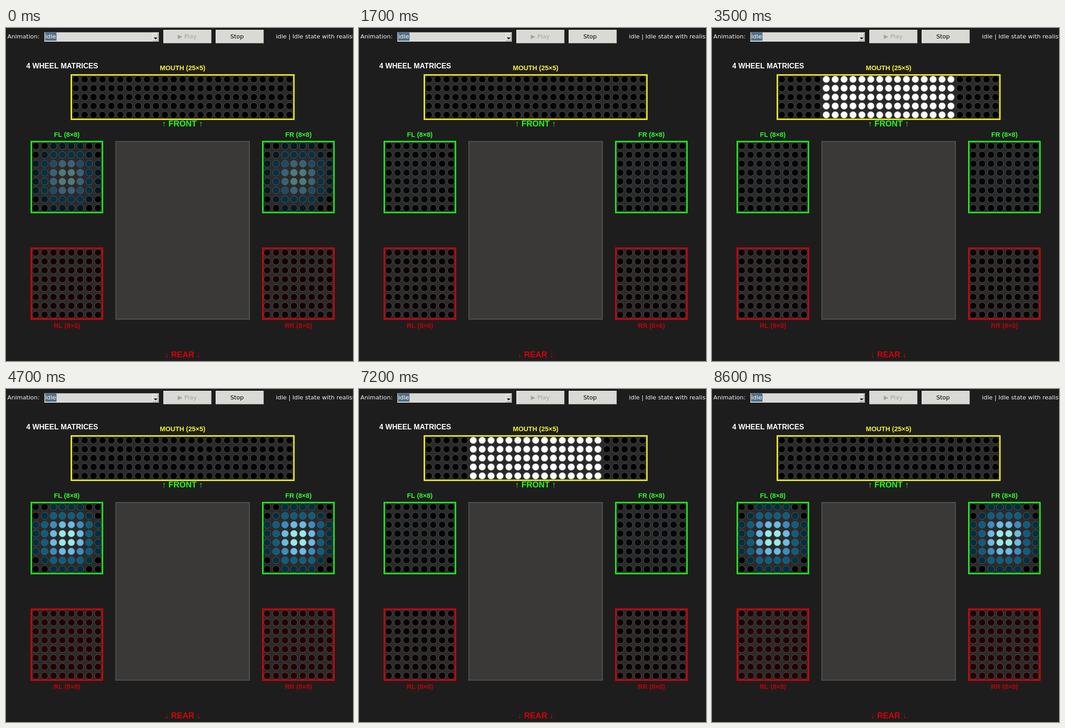
Animation of 763x734 px, one loop 8900 ms. Source, as an HTML page with a canvas:

```html
<!DOCTYPE html>
<html lang="en">
<head>
<meta charset="utf-8">
<title>LED matrices</title>
<style>
html, body { margin: 0; width: 100%; height: 100%; overflow: hidden; background: #1e1d1d; }
canvas { display: block; }
</style>
</head>
<body>
<canvas id="stage" width="763" height="734"></canvas>
<script>
const ctx = document.getElementById("stage").getContext("2d");
const LOOP = 8900;
const STEP = 100;
const CELL = 20;
const GREEN = "#1ff51f", RED = "#d80008", YELLOW = "#f6f62c";
const UI = "13.05px 'DejaVu Sans', sans-serif";
const bold = size => `bold ${size}px 'Liberation Sans', Arial, sans-serif`;

// Each breath swells from start to full, holds until fall, fades out by end
const BREATHS = [
  { start: -600, full: 600, fall: 900, end: 1700 },
  { start: 3500, full: 4700, fall: 5100, end: 6200 },
  { start: 7900, full: 8600, fall: LOOP, end: LOOP + 1000 }
];
const MOUTH_OPEN = [[2900, 3700], [6800, 7900]];

const clamp = v => Math.min(1, Math.max(0, v));
const ease = v => (1 - Math.cos(Math.PI * clamp(v))) / 2;

function breath(t) {
  const swell = BREATHS.map(({ start, full, fall, end }) =>
    ease((t - start) / (full - start)) * ease((end - t) / (end - fall)));
  return 0.05 + 0.95 * Math.max(...swell);
}

function box(x, y, w, h, fill) {
  ctx.fillStyle = fill;
  ctx.fillRect(x, y, w, h);
}

function outlined(x, y, w, h, line, color, fill) {
  box(x, y, w, h, fill);
  ctx.lineWidth = line;
  ctx.strokeStyle = color;
  ctx.strokeRect(x, y, w, h);
}

function bevel(x, y, w, h, light, dark) {
  box(x, y, w, h, dark);
  box(x, y, w - 1, h - 1, light);
  box(x + 1, y + 1, w - 2, h - 2, "#d9d9d6");
}

function label(str, x, y, font, color, align = "center") {
  ctx.font = font;
  ctx.fillStyle = color;
  ctx.textAlign = align;
  ctx.fillText(str, x, y);
}

function matrix(x, y, cols, rows, border, colorAt) {
  outlined(x, y, cols * CELL, rows * CELL, 3, border, "#2a2a2a");
  ctx.lineWidth = 1;
  ctx.strokeStyle = "#5a5a5a";
  for (let r = 0; r < rows; r++) {
    for (let c = 0; c < cols; c++) {
      ctx.beginPath();
      ctx.arc(x + (c + 0.5) * CELL, y + (r + 0.5) * CELL, 7.9, 0, Math.PI * 2);
      ctx.fillStyle = colorAt(c, r);
      ctx.fill();
      ctx.stroke();
    }
  }
}

// Heat drops in rings, from pale cyan at the hub to black in the corners
function glow(c, r, level) {
  const ring = Math.floor(1.2 * Math.hypot(c - 3.5, r - 3.5));
  const heat = clamp(1 - ring / 5);
  const rgb = [Math.max(0, 235 * heat - 85), 235 * heat, Math.min(233, 330 * heat)];
  return `rgb(${rgb.map(v => Math.round(v * level)).join(",")})`;
}

function toolbar() {
  label("Animation:", 3, 23, UI, "#f2f2f2", "left");
  bevel(84, 9, 252, 21, "#858583", "#f4f4f2");
  box(86, 10, 25, 18, "#4f7088");
  label("idle", 86.5, 23, UI, "#fff", "left");
  bevel(322, 11, 13, 18, "#f4f4f2", "#858583");
  ctx.fillStyle = "#000";
  ctx.beginPath();
  ctx.moveTo(325, 21);
  ctx.lineTo(333, 21);
  ctx.lineTo(329, 25);
  ctx.fill();
  bevel(346, 4, 106, 30, "#f4f4f2", "#858583");
  label("▶ Play", 398.5, 23, UI, "#a3a3a1");
  bevel(461, 4, 106, 30, "#f4f4f2", "#858583");
  label("Stop", 508, 23, UI, "#000");
  label("idle | Idle state with realistic", 593.5, 23, UI, "#f2f2f2", "left");
}

function labels() {
  const small = bold(14.6), large = bold(18);
  label("4 WHEEL MATRICES", 44.6, 89, bold(16), "#fff", "left");
  label("MOUTH (25×5)", 388.3, 93, small, YELLOW);
  label("↑ FRONT ↑", 388.3, 217, large, "#1eff1e");
  label("↓ REAR ↓", 388.5, 726, large, "#d80005");
  label("FL (8×8)", 133.7, 240, small, "#2cff2c");
  label("FR (8×8)", 643, 240, small, "#2cff2c");
  label("RL (8×8)", 134, 661, small, "#c00008");
  label("RR (8×8)", 643, 661, small, "#c00008");
}

// Layout units start at the front left wheel
function robot(level, open) {
  const tail = `rgb(${Math.round(9 + 27 * level)},0,0)`;
  ctx.save();
  ctx.translate(55.5, 250.2);
  ctx.scale(0.979, 0.979);
  outlined(190, 0, 300, 400, 2, "#555", "#3a3937");
  matrix(90, -150, 25, 5, YELLOW, c => open && c > 4 && c < 20 ? "#fff" : "#000");
  for (const x of [0, 520]) {
    matrix(x, 0, 8, 8, GREEN, (c, r) => glow(c, r, level));
    matrix(x, 240, 8, 8, RED, () => tail);
  }
  ctx.restore();
}

function draw(t) {
  box(0, 0, 763, 734, "#1e1d1d");
  toolbar();
  robot(breath(t), MOUTH_OPEN.some(([on, off]) => t >= on && t < off));
  labels();
}

function tick() {
  const t = performance.now() % LOOP;
  draw(Math.floor(t / STEP) * STEP);
  requestAnimationFrame(tick);
}
tick();
</script>
</body>
</html>
```
